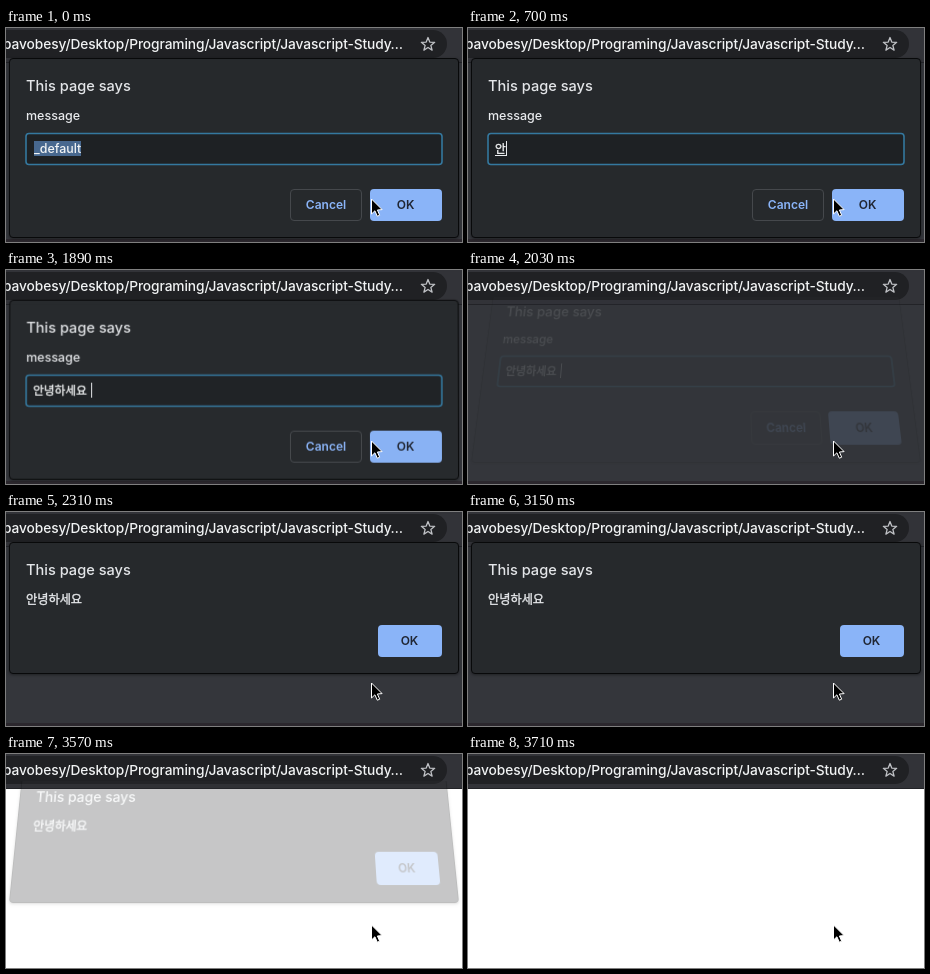
These frames come from a looping animation (456x214 px, 4.55 s). An HTML page:

```html
<!DOCTYPE html>
<html lang="en">
<head>
<meta charset="utf-8">
<title>Prompt and alert</title>
<style>
  :root { --loop: 4550ms step-end infinite; }
  html, body { margin: 0; width: 100%; height: 100%; overflow: hidden; }
  body { position: relative; background: #fff; font-family: Inter, Roboto, sans-serif; }
  svg, .sheets, .sheet { position: absolute; left: 0; top: 0; width: 456px; height: 214px; }
  svg { overflow: visible; }

  .shade { animation: shade var(--loop); }
  .url { font-size: 13.75px; font-weight: 500; letter-spacing: -.1px; fill: #f1f3f4; }

  /* Keeps the tilting sheets off the address bar. */
  .sheets { clip-path: inset(27px 0 0 0); }

  /* Each sheet tilts back about its bottom edge as --p grows. */
  .sheet {
    --p: 0;
    transform:
      translateY(calc(var(--p) * -13px))
      matrix3d(1, 0, 0, 0,
               0, calc(1 + .07 * var(--p)), 0, calc(-.00049 * var(--p)),
               0, 0, 1, 0,
               0, 0, 0, 1);
  }
  .prompt { transform-origin: 228px 209px; animation: prompt var(--loop); }
  .alert { transform-origin: 228px 161px; animation: alert var(--loop); }

  .panel {
    position: absolute; left: 3px; top: 30px; width: 450px; height: 132px;
    box-sizing: border-box; border: 1px solid #08090a; border-radius: 4px;
    background: #26292c; box-shadow: 0 1px 3px rgba(0, 0, 0, .4);
  }
  .prompt .panel { height: 180px; }

  .title { font-size: 14.6px; font-weight: 500; fill: #e3e5e8; }
  .label { font-size: 12.5px; font-weight: 500; fill: #e8eaed; }
  .value { font-size: 12.4px; font-weight: 500; fill: #f1f3f4; }
  .button { font-size: 12px; font-weight: 600; text-anchor: middle; fill: #202633; }
  .korean {
    font-family: "Noto Sans CJK KR", "Noto Sans CJK", "Noto Sans CJK JP", sans-serif;
    font-weight: 500;
    -webkit-text-stroke: .35px #f1f3f4;
  }
  text.korean { font-size: 12.2px; stroke: #e8eaed; stroke-width: .35px; }

  .selected { animation: selected var(--loop); }
  .typed {
    position: absolute; left: 27px; top: 113px; height: 15px;
    display: flex; white-space: pre; word-spacing: 1.5px;
    font-size: 11.7px; line-height: 14px; color: #f1f3f4;
    animation: typed var(--loop);
  }
  .typed::before { content: ""; animation: committed var(--loop); }
  .typed::after {
    content: ""; box-sizing: border-box;
    border: solid #e8eaed; border-width: 0 1px 1px 0;
    animation: composing var(--loop);
  }

  @keyframes shade { 0% { opacity: 1 } 78.46%, 100% { opacity: 0 } }
  @keyframes selected { 0% { visibility: visible } 10.76%, 100% { visibility: hidden } }
  @keyframes typed { 0% { visibility: hidden } 10.76%, 100% { visibility: visible } }

  @keyframes committed {
    0% { content: "" }
    18.46% { content: "안" }
    23.07% { content: "안녕" }
    29.23% { content: "안녕하" }
    33.84% { content: "안녕하세" }
    36.92%, 100% { content: "안녕하세요\a0" }
  }
  @keyframes composing {
    0% { content: "" }
    10.76% { content: "ㅇ" }
    12.3% { content: "아" }
    15.38% { content: "안" }
    18.46% { content: "ㄴ" }
    20% { content: "녀" }
    21.53% { content: "녕" }
    23.07% { content: "ㅎ" }
    24.61% { content: "하" }
    26.15% { content: "핫" }
    29.23% { content: "세" }
    32.3% { content: "셍" }
    33.84% { content: "요" }
    36.92%, 100% { content: "" }
  }

  @keyframes prompt {
    0% { --p: 0; opacity: 1 }
    41.53% { --p: .02; opacity: .98 }
    43.07% { --p: .6; opacity: .5 }
    44.61% { --p: 1.3; opacity: .12 }
    46.15%, 100% { --p: 1.8; opacity: 0 }
  }
  @keyframes alert {
    0% { --p: 1.8; opacity: 0 }
    46.15% { --p: 1.4; opacity: .12 }
    47.69% { --p: .7; opacity: .45 }
    49.23% { --p: .15; opacity: .88 }
    50.76% { --p: 0; opacity: 1 }
    76.92% { --p: .21; opacity: .89 }
    78.46% { --p: 1; opacity: .27 }
    80% { --p: 1.6; opacity: .04 }
    81.53%, 100% { --p: 1.8; opacity: 0 }
  }
</style>
</head>
<body>
  <svg>
    <g class="shade">
      <rect width="456" height="214" fill="#34363b"/>
      <rect y="211" width="456" height="3" fill="#2b272d"/>
    </g>
    <rect width="456" height="35" fill="#323338"/>
    <rect y="34" width="456" height="1" fill="#222327"/>
    <rect x="-20" y="2" width="461" height="28" rx="14" fill="#202124"/>
    <text class="url" x="397" y="21" text-anchor="end">pavobesy/Desktop/Programing/Javascript/Javascript-Study…</text>
    <path transform="translate(422 16.5)" fill="none" stroke="#bfc1c5" stroke-width="1.3" stroke-linejoin="round"
      d="M0-7 1.76-2.43 6.66-2.16 2.85 .93 4.11 5.66 0 3-4.11 5.66-2.85 .93-6.66-2.16-1.76-2.43Z"/>
  </svg>

  <div class="sheets">
    <div class="sheet prompt">
      <div class="panel"></div>
      <svg>
        <text class="title" x="20" y="63">This page says</text>
        <text class="label" x="20" y="92">message</text>
        <rect x="20" y="105.5" width="416" height="31" rx="3" fill="#1e2124" stroke="#34789f" stroke-width="1.6"/>
        <g class="selected">
          <rect x="28" y="113" width="47" height="15" fill="#48688f"/>
          <text class="value" x="28" y="125">_default</text>
        </g>
        <rect x="284.5" y="161.5" width="71" height="31" rx="3.5" fill="none" stroke="#45484c"/>
        <text class="button" x="320" y="181" style="fill:#8ab4f8">Cancel</text>
        <rect x="364" y="161" width="72" height="32" rx="4" fill="#8ab4f8"/>
        <text class="button" x="399.5" y="181">OK</text>
      </svg>
      <div class="typed korean"></div>
    </div>

    <div class="sheet alert">
      <div class="panel"></div>
      <svg>
        <text class="title" x="20" y="63">This page says</text>
        <text class="label korean" x="20" y="92">안녕하세요</text>
        <rect x="372" y="113" width="64" height="32" rx="4" fill="#8ab4f8"/>
        <text class="button" x="403.5" y="133">OK</text>
      </svg>
    </div>
  </div>

  <svg>
    <path transform="translate(365.5 171)" fill="#000" stroke="#fff" stroke-width="1" stroke-linejoin="round"
      d="M0 0V15L3.4 11.8 5.8 17.2 8.2 16.2 5.9 11 10.6 10.6Z"/>
  </svg>
</body>
</html>
```
